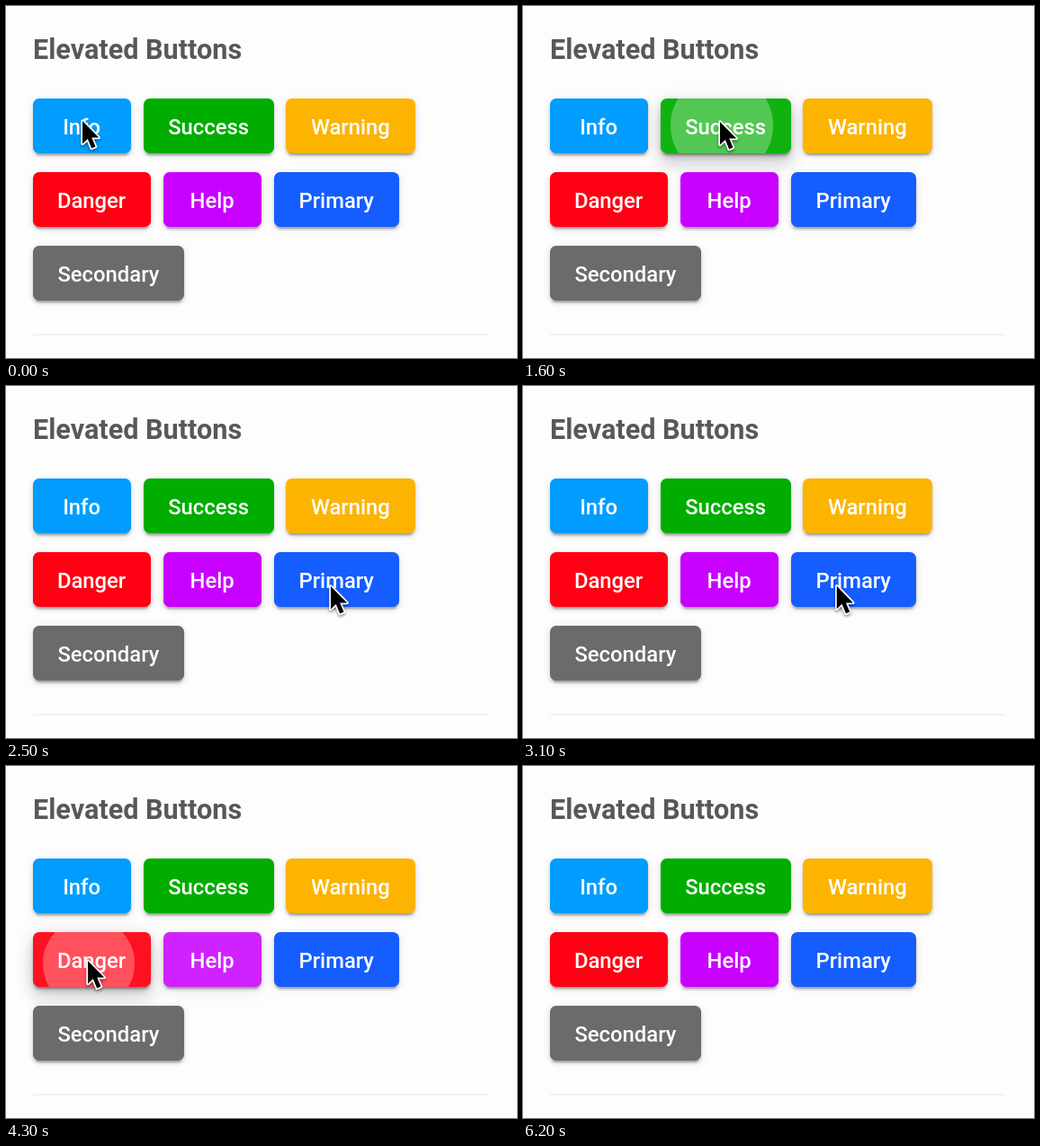
These frames come from a looping animation (568x392 px, 6300 ms). An HTML page:

```html
<!DOCTYPE html>
<html lang="en">
<head>
<meta charset="utf-8">
<title>Elevated Buttons</title>
<style>
  html, body { margin: 0; width: 100%; height: 100%; overflow: hidden; background: #fdfdfd; }
  body { position: relative; font-family: Roboto, sans-serif; }
  h1 { position: absolute; left: 30px; top: 29px; margin: 0; font: 700 30.6px/40px Roboto, sans-serif; color: #585858; white-space: nowrap; }
  hr { position: absolute; left: 30px; top: 365px; width: 506px; height: 2px; margin: 0; border: 0; background: #f2f2f2; }
  .button, .lift { position: absolute; height: 61.2px; border-radius: 6.8px; }
  .button {
    overflow: hidden; color: #fff; text-align: center; white-space: nowrap;
    font-size: 23.8px; font-weight: 500; line-height: 64px;
  }
  .rest { box-shadow: 0 5px 2px -3px #0003, 0 3px 3px #00000024, 0 2px 8px #0000001f; }
  .lift { box-shadow: 0 8px 8px -5px #0003, 0 14px 17px 2px #00000024, 0 5px 24px 3px #0000001f; }
  .ripple { position: absolute; border-radius: 50%; background: #fff; box-shadow: 0 0 0 300px #fff3; }
  svg { position: absolute; left: 0; top: 0; overflow: visible; filter: drop-shadow(0 2px 1.5px #0006); }
</style>
</head>
<body>
<h1>Elevated Buttons</h1>
<hr>
<script>
const LOOP = 6300, STEP = 100, GROW = 400, FADE_AT = 350, RIPPLE = 500;

// label, colour, left, top, width, press time, press point
const buttons = [
  ['Info', '#009dff', 29.6, 102.6, 109, 50, 86, 130],
  ['Success', '#00ad00', 152.6, 102.6, 145, 1471, 221, 133],
  ['Warning', '#fcb400', 311, 102.6, 143.7, 1980, 374, 132],
  ['Danger', '#ff0012', 29.6, 184.6, 131, 4180, 92, 220],
  ['Help', '#c800ff', 174.6, 184.6, 109, 3860, 242, 221],
  ['Primary', '#155dff', 297.5, 184.6, 139.5, 2600, 362, 225],
  ['Secondary', '#6b6b6b', 29.6, 266.6, 168.6, 4500, 112, 303]
].map(([label, color, x, y, width, start, px, py]) => {
  const place = { left: x + 'px', top: y + 'px', width: width + 'px' };
  const lift = add('lift', document.body, place);
  const box = add('button rest', document.body, { ...place, background: color });
  box.textContent = label;
  const cx = px - x, cy = py - y;
  const reach = Math.hypot(Math.max(cx, width - cx), Math.max(cy, 61 - cy));
  return { lift, ripple: add('ripple', box), start, cx, cy, reach };
});

// time, x, y of the pointer tip
const path = [
  [0, 85, 128], [850, 85, 128], [1400, 219, 129], [1700, 219, 129],
  [1950, 373, 129], [2150, 373, 129], [2450, 361, 223], [2950, 361, 223],
  [3700, 243, 221], [3950, 243, 221], [4150, 91, 217], [4300, 91, 217],
  [4480, 111, 301], [4650, 111, 301], [4800, 127, 346]
];

document.body.insertAdjacentHTML('beforeend',
  `<svg width="24" height="40"><path d="M0 0V25.5L5.8 20L10.2 30.5L14.5 28.6L10.2 18.6H18.2Z"
    stroke="#fff" stroke-width="3.4" stroke-linejoin="round" paint-order="stroke"/></svg>`);
const pointer = document.querySelector('svg');

function add(className, parent, style) {
  const el = parent.appendChild(document.createElement('div'));
  el.className = className;
  Object.assign(el.style, style);
  return el;
}

const clamp = v => Math.max(0, Math.min(1, v));
const smooth = v => v * v * (3 - 2 * v);

function drawButton({ lift, ripple, start, cx, cy, reach }, t) {
  const age = t - start;
  const active = age >= 0 && age < RIPPLE;
  const grow = clamp(age / GROW);
  const fade = clamp((RIPPLE - age) / (RIPPLE - FADE_AT));
  const r = reach * (1 - (1 - grow) ** 3);
  Object.assign(ripple.style, {
    left: cx - r + 'px', top: cy - r + 'px', width: 2 * r + 'px', height: 2 * r + 'px',
    opacity: active ? 0.33 * clamp(0.5 + 1.5 * grow) * fade : 0
  });
  lift.style.opacity = active ? 0.75 * smooth(clamp((age + 20) / 180)) * smooth(clamp((RIPPLE - age) / 250)) : 0;
}

function drawPointer(t) {
  const i = path.findIndex(p => p[0] > t);
  pointer.style.display = i < 0 && t > 4800 ? 'none' : 'block';
  const [t1, x1, y1] = path[i < 0 ? path.length - 1 : i];
  const [t0, x0, y0] = path[i < 0 ? path.length - 2 : i - 1];
  const k = smooth(clamp((t - t0) / (t1 - t0)));
  pointer.style.transform = `translate(${x0 + (x1 - x0) * k}px, ${y0 + (y1 - y0) * k}px)`;
}

const origin = performance.now();
function frame() {
  const t = Math.floor((performance.now() - origin) % LOOP / STEP) * STEP;
  buttons.forEach(b => drawButton(b, t));
  drawPointer(t);
  requestAnimationFrame(frame);
}
frame();
</script>
</body>
</html>
```
